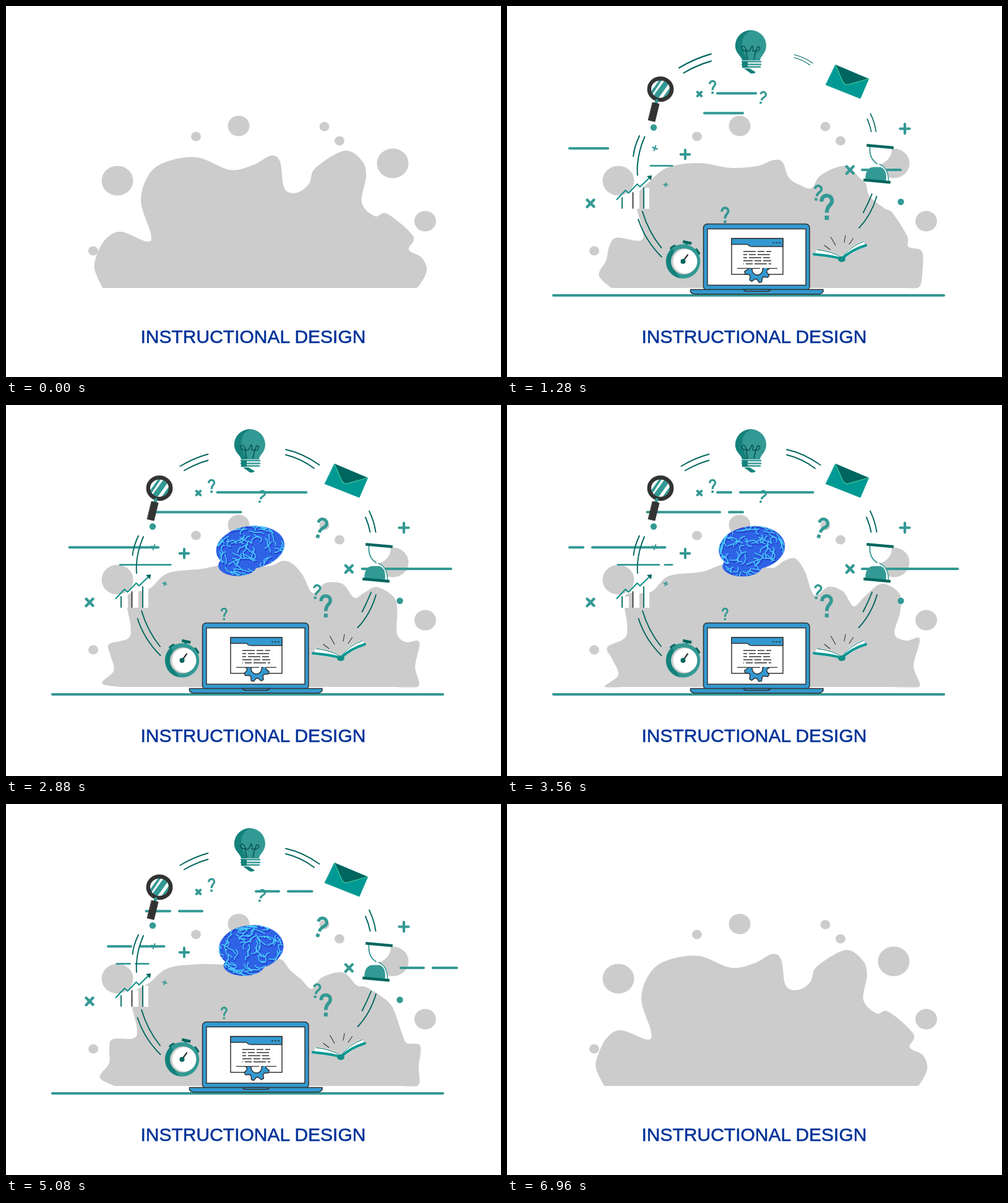
An HTML page that plays this animation: 800 px wide and 600 px high, repeating every 7000 ms.

```html
<!DOCTYPE html>
<html lang="en">
<head>
<meta charset="utf-8">
<title>Instructional design</title>
<style>
html, body { margin: 0; width: 100%; height: 100%; overflow: hidden; background: #fff; }
svg { display: block; width: 100vw; height: 100vh; }
</style>
</head>
<body>
<svg id="stage" viewBox="0 0 800 600" fill="none" stroke-linecap="round" stroke-linejoin="round"></svg>
<script>
const LOOP = 7000, MIDDLE = 3540;
const TEAL = '#339994', DEEP = '#14817b', DARK = '#00665f', INK = '#333', BLUE = '#3399d0';
const stage = document.getElementById('stage');
const updates = [];
const clamp = (v, a = 0, b = 1) => Math.min(b, Math.max(a, v));
const lerp = (a, b, k) => a + (b - a) * k;

function add(tag, attrs = {}, parent = stage, inner = '') {
  const el = document.createElementNS('http://www.w3.org/2000/svg', tag);
  set(el, attrs);
  el.innerHTML = inner;
  parent.appendChild(el);
  return el;
}
function set(el, attrs) {
  for (const k in attrs) el.setAttribute(k, attrs[k]);
}
const stroke = (d, color, width, extra = '') => `<path d="${d}" stroke="${color}" stroke-width="${width}" ${extra}/>`;
const fill = (d, color, extra = '') => `<path d="${d}" fill="${color}" ${extra}/>`;
const disc = (x, y, r, color, ry = r) => `<ellipse cx="${x}" cy="${y}" rx="${r}" ry="${ry}" fill="${color}"/>`;

// Scale rising past full size, then settling
function pop(u, over) {
  if (u <= 0) return 0;
  if (u >= 1) return 1;
  return u < .7 ? over * Math.sin(u / .7 * Math.PI / 2) : lerp(over, 1, (u - .7) / .3);
}
function popping(x, y, start, end, over, markup) {
  const g = add('g', {}, stage, markup);
  updates.push(t => {
    const s = pop(Math.min(t - start, end - t) / 500, over);
    set(g, {
      display: s ? 'inline' : 'none',
      transform: `translate(${x} ${y}) scale(${s}) translate(${-x} ${-y})`
    });
  });
  return g;
}

// Splash: key points of the low and the high outline, joined by a smooth curve
const low = [156,456, 143,424, 149,397, 163,375, 186,365, 228,381, 234,368, 218,315, 232,271, 262,251,
  310,245, 362,265, 400,257, 428,242, 443,252, 450,295, 470,302, 490,287, 500,262, 547,234, 575,250,
  582,275, 575,318, 596,340, 616,336, 658,372, 651,394, 672,407, 680,428, 667,453, 660,456];
const high = [190,456, 158,456, 180,437, 170,411, 162,392, 190,377, 194,356, 191,308, 232,303, 261,277,
  315,270, 358,256, 412,262, 432,263, 448,252, 466,248, 481,268, 497,308, 520,294, 543,302, 560,326,
  577,311, 605,289, 634,304, 636,333, 626,370, 645,381, 667,378, 657,422, 666,456, 620,456];

function smooth(p) {
  const n = p.length / 2, at = i => { i = clamp(i, 0, n - 1) * 2; return [p[i], p[i + 1]]; };
  let d = `M${at(0)}`;
  for (let i = 0; i < n - 1; i++) {
    const [a, b, c, e] = [at(i - 1), at(i), at(i + 1), at(i + 2)];
    d += `C${b.map((v, k) => v + (c[k] - a[k]) / 6)} ${c.map((v, k) => v - (e[k] - b[k]) / 6)} ${c}`;
  }
  return d + 'Z';
}
add('clipPath', { id: 'floor' }, stage, '<path d="M0 0H800V456.5H0z"/>');
const splash = add('path', { fill: '#ccc', 'clip-path': 'url(#floor)' });
updates.push(t => {
  const k = 1 - Math.abs(t - MIDDLE) / MIDDLE;
  splash.setAttribute('d', smooth(low.map((v, i) => lerp(v, high[i], k))));
});
const drop = (x, y, r) => add('g', {}, stage, disc(x, y, r, '#ccc', r * .945));
for (const [x, y] of [[180, 282.5], [625, 254.5]]) drop(x, y, 25.5);
for (const [x, y] of [[376, 194], [677.5, 348]]) drop(x, y, 17.5);
for (const [x, y] of [[307, 211], [514.5, 195], [539, 218], [141, 396]]) drop(x, y, 8);

// A long and a short dash running through a fixed range
function runner(x, y, dir, range, width) {
  const path = add('path', { stroke: TEAL, 'stroke-width': width });
  const speed = .0518 * range / 158, inset = width / 2;
  const travel = (t, from) => clamp((t - from) * speed, 0, range);
  const dash = (t, from, to) => {
    const head = travel(t, from) - inset, tail = travel(t, to) + inset;
    return head > tail ? `M${x + dir * tail} ${y}H${x + dir * head}` : '';
  };
  updates.push(t => path.setAttribute('d', dash(t, 10, 2850) + dash(t, 3060, 3850)));
}
runner(338, 141.3, 1, 158.5, 4);
runner(383, 173.2, -1, 158.5, 4);
runner(99, 230.2, 1, 158.5, 4);
runner(268.5, 258.4, -1, 91, 2.6);
runner(572, 265, 1, 158.5, 4);

// Small marks
function plus(x, y, r, width, angle) {
  popping(x, y, 480, 6600, 1.15,
    stroke(`M${x - r} ${y}h${2 * r}M${x} ${y - r}v${2 * r}`, TEAL, width, `transform="rotate(${angle} ${x} ${y})"`));
}
plus(288, 240, 7.3, 4, 0);
plus(643, 198.5, 7.6, 4.2, 0);
plus(239, 230, 4, 2.2, 20);
plus(256.5, 289, 3.2, 2, 15);
plus(311, 142.3, 4.6, 4, 45);
popping(237, 196.5, 500, 5750, 1.15, disc(237, 196.5, 5.2, TEAL));
popping(636.5, 316.7, 500, 5750, 1.15, disc(636.5, 316.7, 5.2, TEAL));

// Cross whose arms fly apart
function burst(x, y) {
  const g = add('g', { stroke: TEAL, 'stroke-width': 4.4, transform: `translate(${x} ${y})` });
  const fly = add('path', { d: 'M-5.5 -5.5L0 0' }, g);
  const arm = add('path', { d: 'M-5.5 6L5.5 -5.5' }, g);
  const stub = add('path', { d: 'M0 0L5.5 5.5' }, g);
  updates.push(t => {
    const q = clamp(Math.max((t - 5710) / 250, (1150 - t) / 250));
    set(g, { display: q < 1 ? 'inline' : 'none' });
    set(fly, { transform: `translate(${-40 * q} ${-42 * q})`, opacity: clamp(1 - 1.4 * q) });
    set(arm, { transform: `translate(${-11 * q} ${8 * q}) scale(${clamp(2 - 2 * q)})` });
    set(stub, { transform: `translate(${-2 * q} ${-7 * q}) scale(${1 - q})` });
  });
}
burst(135, 319);
burst(554.3, 265);

function question(x, y, height, angle, start, end) {
  popping(x, y, start, end, 1.65, `<g transform="translate(${x} ${y}) rotate(${angle}) scale(${height / 36})" stroke-linecap="butt">`
    + stroke('M-7 -7.5C-7.5 -18.5 7.5 -18.5 7.5 -8.5C7.5 -2 .3 -3 .3 8', TEAL, 5.4) + fill('M-2.7 12h6v6h-6z', TEAL) + '</g>');
}
question(332, 131, 22, 0, 300, 6700);
question(412.5, 148, 21, 18, 300, 6700);
question(352.2, 338, 20, 0, 850, 6150);
question(501.5, 302, 24, 12, 800, 5835);
question(516.5, 325, 37, 0, 810, 5871);
question(508.5, 199, 34, 20, 1600, 5700);

// Turning brain: folds wander over a sphere; its outline narrows when seen from the front
const brain = popping(395, 237, 1500, 5600, 1.1, '');
const skull = add('clipPath', { id: 'skull' }, brain);
const lobe = add('ellipse', {}, skull), stem = add('ellipse', {}, skull);
const tissue = add('g', { 'clip-path': 'url(#skull)' }, brain, '<path d="M320 180H470V290H320z" fill="#2f63e6"/>');
const shade = add('path', { stroke: '#2844d2', 'stroke-width': 2.6, transform: 'translate(1 2)' }, tissue);
const light = add('path', { stroke: '#48cbfa', 'stroke-width': 1.6 }, tissue);
let seed = 11;
const random = () => (seed = seed * 16807 % 2147483647) / 2147483647;
const FOLDS = 170;
const folds = Array.from({ length: FOLDS }, (_, i) => {
  let lat = Math.asin(1 - 2 * (i + .5) / FOLDS), lon = i * 2.39996, heading = random() * 6.28;
  return Array.from({ length: 6 }, () => {
    heading += (random() - .5) * 2;
    lat += Math.sin(heading) * .09;
    lon += Math.cos(heading) * .09 / Math.max(.3, Math.cos(lat));
    return [lat, lon];
  });
});
updates.push(t => {
  const turn = (t - 2700) / 1700 * Math.PI / 2, s = Math.sin(turn) ** 4;
  const cx = lerp(395, 398, s), rx = lerp(55.5, 48, s);
  set(lobe, { cx, cy: lerp(230.5, 234, s), rx, ry: lerp(34.5, 38, s), transform: `rotate(${lerp(-8, 0, s)} ${cx} 232)` });
  set(stem, { cx: lerp(374, 398, s), cy: lerp(260, 263, s), rx: lerp(31, 35, s), ry: 16.5 });
  let d = '';
  for (const fold of folds) {
    let pen = 'M';
    for (const [lat, lon] of fold) {
      const a = lon + turn;
      if (Math.cos(a) * Math.cos(lat) < .04) { pen = 'M'; continue; }
      d += `${pen}${(cx + rx * Math.cos(lat) * Math.sin(a)).toFixed(1)} ${(237 - 43 * Math.sin(lat)).toFixed(1)}`;
      pen = 'L';
    }
  }
  set(shade, { d });
  set(light, { d });
});

// Ring of double arcs
const arc = (x, y, start, end, d) => popping(x, y, start, end, 1.15, stroke(d, DARK, 1.9));
arc(304, 92, 930, 5860, 'M281.5 99Q303 86 326.5 79.5M288 106Q307 95 326.5 89.5');
arc(479, 87, 1170, 5700, 'M452 72Q480 78 506.5 97M452 80.5Q478 87 498 102.5');
arc(590, 189, 1095, 5720, 'M587 171.5Q595 188 597.5 205.5M581 181.5Q586 193 588.5 205.5');
arc(583, 331, 1060, 5740, 'M598 307Q589 338 568.5 360M590 303Q584 318 575.5 334.5');
arc(213, 243, 830, 5770, 'M222 213Q209 243 211 272M214 211.5Q206 228 204.5 243');
arc(231, 369, 800, 5780, 'M219 333Q229 366 249 390.5M212.5 345.5Q224 380 249.5 405');

// Icons
const icon = (x, y, start, markup) => popping(x, y, start, LOOP - start, 1.13, markup);
icon(394, 75, 60,
  fill('M380 88C380 81 369 77 369 64A25 25 0 0 1 419 64C419 77 409 81 409 88Z', TEAL)
  + fill('M380 88C380 81 369 77 369 64A25 25 0 0 1 396 39.5C381 44 379 57 381 68C382 77 388 82 388 88Z', DEEP)
  + stroke('M389 86L386 72C379 74 377 65 382 65C387 65 386 76 391 73C396 70 394 63 397 65C400 69 394 74 400 73C406 72 402 65 407 66C411 68 407 74 402 73L399 86', '#0b5754', 1.6)
  + stroke('M380 90H410M380 94.5H410M381 98.5H409', TEAL, 2.6)
  + fill('M380 89h9v11h-9zM383 101H392L402 107Q400 110 394 109Z', DEEP));
icon(550, 122, 90,
  fill('M531 95.5L584.5 118L571 149.5L515.5 127.5Z', '#009994', 'stroke="#009994"')
  + fill('M531 95L585 118L552 127Q547 129 544 124Z', DARK)
  + stroke('M531 96L543 123Q547 129 552 127L584 118', '#35bd98', 1.5));
icon(248, 150, 70,
  disc(248, 134.5, 18, '#fff')
  + fill('M236 146L255 120L262 125L244 150ZM233 138L246 120L251 119L235 143ZM251 149L264 131L264 138L256 148Z', TEAL)
  + `<ellipse cx="248" cy="134.5" rx="18.2" ry="17.3" stroke="${INK}" stroke-width="6.5"/>`
  + stroke('M242 153L240 160', TEAL, 5)
  + fill('M235.5 156L246 158.5L239 187L228.5 184.5Z', INK, `stroke="${INK}"`));
icon(600, 255, 110,
  fill('M586 228L622 231Q622 248 604 256Q617 262 617 285L579 282Q579 262 595 256Q584 247 586 228Z', '#fff')
  + stroke('M586.5 228Q585 247 598 255', TEAL, 1.8)
  + fill('M579.5 282C578 268 584 261 592 260.5L604 260.5C613 264 614 275 612 285Z', TEAL)
  + stroke('M602 256Q617 262 616.5 284', TEAL, 1.5)
  + stroke('M583.5 225.5L622.5 229M578.5 281.5L617.5 285', DARK, 4.6, 'stroke-linecap="square"'));
icon(205, 301, 100,
  fill('M187 310h10v18h-10zM204 301h10v27h-10zM222 294h8v34h-8z', '#fff')
  + stroke('M186 310V327M221 294V327', DARK, 1.8) + stroke('M203.5 302V327', INK, 1.8)
  + stroke('M177.5 313L191.5 298L196.5 302.5L210.5 288L215 292.5L231 277', '#109088', 2)
  + fill('M226 275L234 274L233 282Z', DARK));
icon(284, 410, 80,
  stroke('M290.5 384L289 391M268 390L273 396M307 397L302 401', TEAL, 5)
  + stroke('M286.5 381.5L296 383.5', DARK, 4.5, 'stroke-linecap="square"')
  + stroke('M265.5 392L271 388.5M306 394.5L310 400', DARK, 4.5)
  + disc(284.5, 413, 27.8, TEAL)
  + fill('M267 392A27.5 27.5 0 0 0 280 440Q262 420 270 398Z', DEEP)
  + disc(286, 413, 21, '#ccc') + disc(288, 413, 19.5, '#fff')
  + stroke('M284.5 413L292 402.5', INK, 2.2) + disc(284.5, 413, 4, DARK));
icon(540, 392, 100,
  fill('M500 393Q527 396 541 406Q553 388 576 380L579 387L541 409L498 402Z', '#fff')
  + stroke('M496 401.5Q525 404 541 409Q557 394 580 387', '#009994', 4)
  + stroke('M501 394Q527 397 541 407Q554 389 576 381', DARK, 1)
  + disc(541, 409.5, 6, '#109088', 4.6)
  + stroke('M513 387L522 394M523.5 374L531 387M547 371L545 382M559.5 376L553 385.5', INK, 1.1));

// Ground and laptop
popping(390.5, 468, 40, 6950, 1.11, stroke('M75 468H706', TEAL, 4.2));
const outlined = `stroke="${INK}" stroke-width="1.5"`;
const panel = (d, color) => fill(d, color, outlined);
const flat = 'stroke-linecap="butt"';
const textRows = [0, 1, 2, 3, 4].map(i =>
  stroke(`M382 ${397 + 5 * i}H427`, INK, 1.3, `${flat} stroke-dasharray="20 3 11 3" stroke-dashoffset="${i * 14}"`)).join('');
popping(404, 352, 50, 6950, 1.15,
  `<rect x="317.5" y="352.5" width="171.5" height="107" rx="6" fill="${BLUE}" ${outlined}/>`
  + panel('M324 360.5H483V451.5H324Z', '#fff')
  + panel('M296.5 458.5H511V462Q508 466 503 466H305Q299 466 296.5 462Z', BLUE)
  + panel('M382 458.5H426Q424 461.5 420 461.5H388Q384 461.5 382 458.5Z', BLUE)
  + panel('M363 376H446V434H363Z', '#fff')
  + panel('M363 376H446V389H397Q391 389 389 385.5H363Z', BLUE)
  + '<clipPath id="half"><path d="M370 424H440V450H370z"/></clipPath><g clip-path="url(#half)"><g id="gear"></g></g>'
  + stroke('M429 383H443', INK, 1.5, `${flat} stroke-dasharray="3 2"`)
  + textRows
  + stroke('M372 424.3H437', INK, 1.3, `${flat} stroke-dasharray="37 4 3 4"`));
const gear = document.getElementById('gear');
const teeth = Array.from({ length: 32 }, (_, i) => {
  const r = i % 4 < 2 ? 21 : 15.5, a = i * Math.PI / 16;
  return `${r * Math.cos(a)} ${r * Math.sin(a)}`;
});
gear.innerHTML = panel(`M${teeth.join('L')}Z`, BLUE) + `<circle r="8.5" fill="#fff" ${outlined}/>`;
updates.push(t => set(gear, { transform: `translate(404.7 426.5) rotate(${t * .02})` }));

add('text', {
  x: 399.5, y: 544.7, 'text-anchor': 'middle', fill: '#003399', stroke: '#003399', 'stroke-width': .6,
  'font-family': '"Liberation Sans", Arial, sans-serif', 'font-size': 30
}, stage, 'INSTRUCTIONAL DESIGN');

const began = performance.now();
function draw() {
  const t = (performance.now() - began) % LOOP;
  for (const update of updates) update(t);
  requestAnimationFrame(draw);
}
draw();
</script>
</body>
</html>
```
